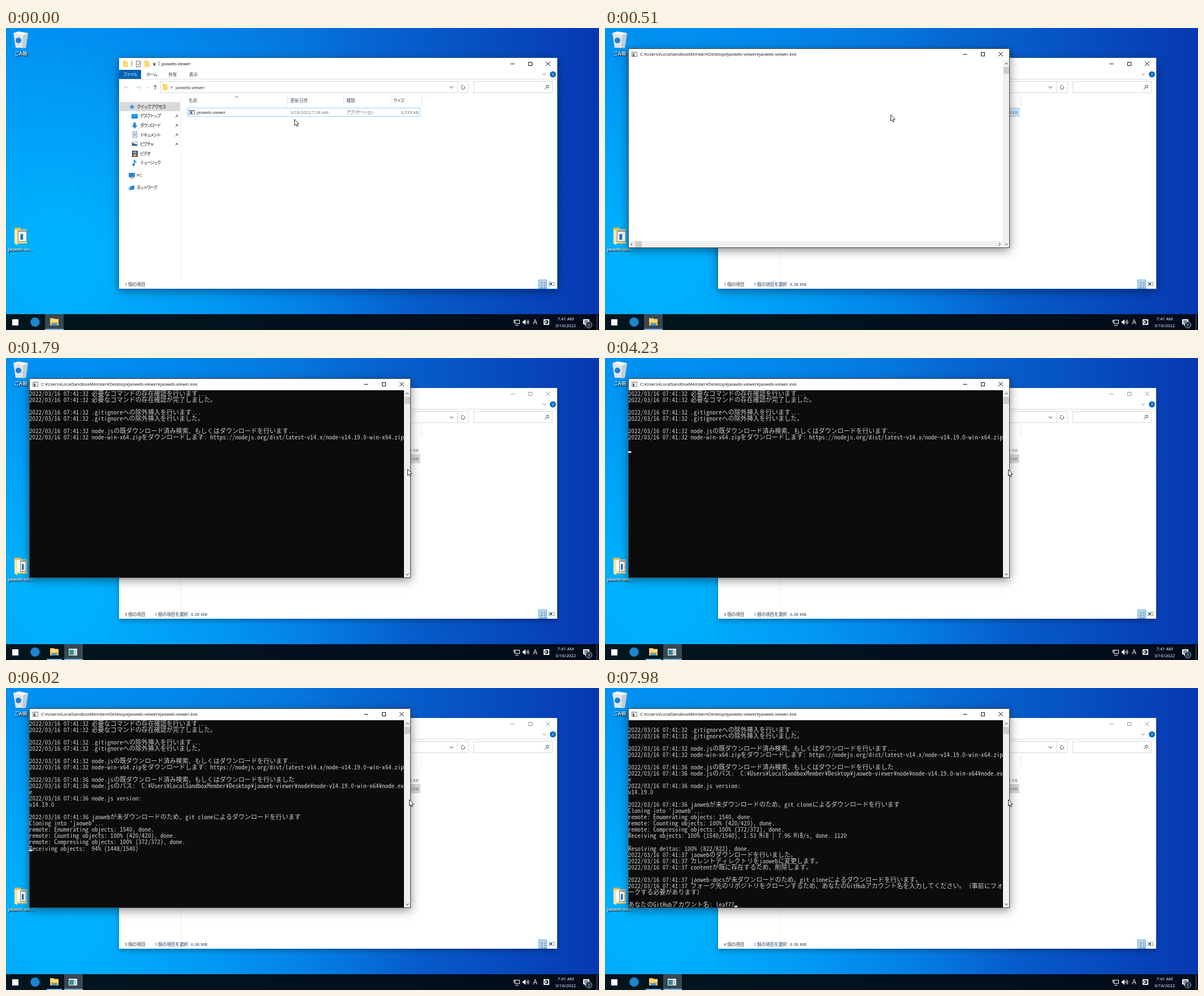
An HTML page with a canvas for the animation above (8 s loop, 1049 by 534 pixels).

```html
<!DOCTYPE html>
<html lang="ja">
<head>
<meta charset="utf-8">
<title>Console setup</title>
<style>
html, body { margin: 0; width: 100%; height: 100%; overflow: hidden; background: #0078d7; }
canvas { display: block; }
</style>
</head>
<body>
<canvas id="stage" width="1049" height="534"></canvas>
<script>
const W = 1049, H = 534, LOOP = 8000;
const g = document.getElementById('stage').getContext('2d');
const UI = '"Open Sans", "Noto Sans CJK JP", "Noto Sans CJK", sans-serif';
const MONO = '"Noto Sans Mono CJK JP", "Noto Sans CJK JP", monospace';
const KANA = -1.75;
const HOME = 'C:¥Users¥LocalSandboxMember¥Desktop¥jaoweb-viewer¥';
const PROMPT = 'あなたのGitHubアカウント名: ';
const ACCOUNT = 'leaf77';
const COLS = 120, ROWS = 30, CELL = 5.523, LINE = 11.04;
const CON = { x: 41, y: 36, w: 675, h: 353 };

// key times in ms
const SELECT = 340, OPEN = 400, WHITE = 510, BLACK = 580, BLUR = 650, FILES = 1650;
const WAIT = 2170, CLONE = 4710, TYPE = 6680;

// ---------- helpers ----------
const clamp = k => Math.max(0, Math.min(1, k));
const smooth = k => k * k * (3 - 2 * k);
const hold = (t, step) => Math.floor(t / step) * step;
const cells = ch => ch.charCodeAt(0) > 255 ? 2 : 1;

function box(x, y, w, h, c) { g.fillStyle = c; g.fillRect(x, y, w, h); }

function frame(x, y, w, h, c) {
  g.strokeStyle = c; g.lineWidth = 1;
  g.strokeRect(x + .5, y + .5, w - 1, h - 1);
}

function trace(points) {
  g.beginPath();
  for (let i = 0; i < points.length; i += 2) g.lineTo(points[i], points[i + 1]);
}

function line(c, w, ...points) {
  g.strokeStyle = c; g.lineWidth = w;
  trace(points); g.stroke();
}

function poly(c, ...points) {
  g.fillStyle = c;
  trace(points); g.fill();
}

function disc(x, y, r, c) {
  g.fillStyle = c;
  g.beginPath(); g.arc(x, y, r, 0, 7); g.fill();
}

function ring(x, y, r, c, from = 0, to = 7) {
  g.strokeStyle = c; g.lineWidth = 1;
  g.beginPath(); g.arc(x, y, r, from, to); g.stroke();
}

function text(s, x, y, c = '#222', gap = 0, align = 'left', size = 7.7) {
  g.font = size + 'px ' + UI;
  g.letterSpacing = gap + 'px';
  g.textAlign = align;
  g.fillStyle = c;
  g.fillText(s, x, y + 2.9);
}

// quarter turns: 0 right, 1 down, 2 left, 3 up
function turned(x, y, turn, paint) {
  g.save();
  g.translate(x, y); g.rotate(turn * Math.PI / 2);
  paint();
  g.restore();
}
const chevron = (x, y, r, c, turn) =>
  turned(x, y, turn, () => line(c, 1, -r * .6, -r, r * .6, 0, -r * .6, r));
const arrow = (x, y, c, turn) => turned(x, y, turn, () => {
  line(c, 1, -4, 0, 4, 0);
  line(c, 1, 1, -3, 4, 0, 1, 3);
});

function folder(x, y, w, h) {
  box(x, y, w * .5, h, '#e9b746');
  box(x, y + h * .12, w, h * .88, '#ffd875');
}

function appIcon(x, y, w, h) {
  box(x, y, w, h, '#7b8790');
  box(x + 1, y + 2, w - 2, h - 3, '#f4f8fa');
  box(x + w * .28, y + h * .32, w * .3, h * .5, '#1d6fc2');
}

function winButtons(x, y, c) {
  line(c, 1, x - 3.5, y + .5, x + 3.5, y + .5);
  frame(x + 28, y - 3, 7, 7, c);
  line(c, 1, x + 59, y - 3.5, x + 67, y + 4);
  line(c, 1, x + 67, y - 3.5, x + 59, y + 4);
}

function panel(x, y, w, h, fill, blur, shade) {
  g.save();
  g.shadowColor = 'rgba(0,0,0,' + shade + ')';
  g.shadowBlur = blur; g.shadowOffsetY = 4;
  box(x, y, w, h, fill);
  g.restore();
}

// ---------- desktop ----------
function desktop(t) {
  const base = g.createLinearGradient(0, 0, W, 0);
  base.addColorStop(0, '#0088e8');
  base.addColorStop(.5, '#0672da');
  base.addColorStop(1, '#0738b2');
  box(0, 0, W, H, base);
  const glow = g.createRadialGradient(90, 410, 60, 90, 410, 640);
  glow.addColorStop(0, 'rgba(0,180,255,.95)');
  glow.addColorStop(.4, 'rgba(0,168,255,.65)');
  glow.addColorStop(1, 'rgba(0,140,255,0)');
  box(0, 0, W, H, glow);

  poly('#dfe6ea', 13, 9, 39, 9, 35, 35, 17, 35);
  poly('#f5f7f8', 13, 9, 22, 6, 39, 9, 30, 13);
  poly('#c4ced4', 30, 13, 39, 9, 35, 35, 29, 36);
  disc(22, 22, 5, '#1f7fd6');
  label('ごみ箱', 26, 45, -.2);

  folder(15, 353, 22, 28);
  const extra = t >= FILES;
  if (extra) box(20, 357, 9, 21, '#fff');
  appIcon(extra ? 25 : 21, 358, extra ? 11 : 16, 20);
  poly('#ffe7a3', 15, 356, 20, 359, 20, 384, 15, 381);
  label('jaoweb-vie...', 26, 391, 0);
}

function label(s, x, y, gap) {
  g.save();
  g.shadowColor = '#000'; g.shadowBlur = 2;
  g.shadowOffsetX = g.shadowOffsetY = .8;
  for (let i = 0; i < 2; i++) text(s, x, y, '#fff', gap, 'center');
  g.restore();
}

// ---------- file window ----------
function explorer(t) {
  const active = t < BLUR;
  panel(200, 53, 775, 408, '#fff', active ? 16 : 8, active ? .45 : .28);
  if (active) frame(199, 52, 777, 410, '#1767b4');
  toolbar(active ? '#111' : '#999');
  navigation();
  files(t, active);
  status(t);
}

function toolbar(ink) {
  folder(207, 58, 9, 11);
  folder(245, 58, 9, 11);
  frame(230, 58, 8, 11, '#777');
  line('#c0571c', 1, 232, 63, 234, 66, 237, 61);
  box(222, 58, 1, 10, '#777');
  box(270, 59, 1, 8, '#777');
  box(260, 62, 5, 1, '#222');
  poly('#222', 260, 64, 265, 64, 262.5, 67);
  text('jaoweb-viewer', 275, 63, ink);
  winButtons(896, 63, ink);

  box(200, 74, 39, 16, '#0062b3');
  text('ファイル', 207, 82, '#fff', KANA);
  text('ホーム', 248, 82, '#333', -1.5);
  text('共有', 287, 82, '#333');
  text('表示', 324, 82, '#333');
  chevron(952, 82, 2.5, '#888', 1);
  disc(967.5, 82, 5.5, '#0f6cbd');
  text('?', 967.5, 82, '#fff', 0, 'center');
  box(200, 90, 775, 1, '#dcdcdc');

  arrow(213, 105, '#c4c4c4', 2);
  arrow(234, 105, '#c4c4c4', 0);
  chevron(250, 105, 2, '#c4c4c4', 1);
  arrow(264, 105, '#444', 3);
  frame(273, 94, 526, 21, '#d9d9d9');
  frame(798, 94, 21, 21, '#d9d9d9');
  frame(827, 94, 140, 21, '#d9d9d9');
  folder(277, 99, 9, 11);
  chevron(293, 105, 2, '#444', 0);
  text('jaoweb-viewer', 300, 105);
  chevron(788, 105, 3, '#444', 1);
  ring(808.5, 105.5, 3, '#444', -.9, 4.2);
  box(806, 101, 3, 1, '#444');
  ring(958, 103.5, 2.5, '#444');
  line('#444', 1, 956, 105.5, 953, 108.5);
}

const columns = [
  { name: '名前', x: 323, end: 497 },
  { name: '更新日時', x: 503, end: 597 },
  { name: '種類', x: 602, end: 680 },
  { name: 'サイズ', x: 685, end: 735, gap: -1.5 }
];

function files(t, active) {
  for (const c of columns) {
    text(c.name, c.x, 128, '#44546a', c.gap);
    box(c.end, 120, 1, 18, '#e3e3e3');
  }
  chevron(408, 122, 3, '#777', 3);

  const names = t < FILES ? ['jaoweb-viewer'] : ['node', '.gitignore', 'jaoweb-viewer'];
  const sizes = { '.gitignore': '1 KB', 'jaoweb-viewer': '6,535 KB' };
  const kinds = { node: 'ファイル フォルダー', '.gitignore': 'テキスト', 'jaoweb-viewer': 'アプリケーション' };
  const fill = !active ? '#d9d9d9' : t < 60 ? '#fff' : t < SELECT ? '#e5f3ff' : '#cce8ff';
  names.forEach((name, i) => {
    const y = 149 + i * 14.3;
    if (name === 'jaoweb-viewer') {
      const top = Math.round(y - 8);
      box(320, top, 413, 16, fill);
      if (active) frame(320, top, 413, 16, '#99d1ff');
    }
    appIcon(323, y - 4, 11, 8);
    text(name, columns[0].x + 14, y);
    text('3/16/2022 7:38 AM', columns[1].x, y, '#6d6d6d');
    text(kinds[name], columns[2].x, y, '#6d6d6d', KANA);
    text(sizes[name] || '', 730, y, '#6d6d6d', 0, 'right');
  });
}

function status(t) {
  const count = t >= 6490 ? 4 : t >= FILES ? 3 : 1;
  text(count + ' 個の項目', 210, 453, '#333', -.1);
  if (t >= SELECT) {
    text('1 個の項目を選択', 263, 453, '#1e395b', -.15);
    text('6.38 MB', 327, 453, '#1e395b');
  }
  box(942, 445, 15, 16, '#c5e5fb');
  frame(942, 445, 15, 16, '#4ba0dc');
  for (let y = 449; y < 459; y += 3) {
    box(945, y, 5, 1, '#667'); box(951, y, 4, 1, '#667');
  }
  frame(960, 449, 10, 7, '#8a9aa8');
  box(962, 451, 4, 3, '#24547c');
}

function star(x, y, r, c) {
  const points = [];
  for (let i = 0; i < 10; i++) {
    const a = i * Math.PI / 5, d = i % 2 ? r * .42 : r;
    points.push(x + d * Math.sin(a), y - d * Math.cos(a));
  }
  poly(c, ...points);
}

const places = [
  ['デスクトップ', y => { box(222, y - 4, 11, 8, '#0b78c9'); box(222, y - 4, 11, 6, '#1ca0ed'); }],
  ['ダウンロード', y => {
    box(225.5, y - 5, 4, 6, '#2188d8');
    poly('#2188d8', 222.5, y, 232.5, y, 227.5, y + 6);
  }],
  ['ドキュメント', y => {
    box(224, y - 6, 8, 11, '#fdfdfd');
    frame(224, y - 6, 8, 11, '#8094a4');
    for (let i = -3; i < 3; i += 2) box(226, y + i, 4, 1, '#4a8cc4');
  }],
  ['ピクチャ', y => {
    box(222, y - 4, 11, 8, '#a9b8c4');
    box(223, y - 3, 9, 6, '#e2f0fa');
    poly('#2f6b96', 223, y - 2, 232, y + 1, 232, y + 3, 223, y + 3);
  }],
  ['ビデオ', y => {
    box(223, y - 5, 10, 11, '#39424d');
    box(225, y - 4, 6, 4, '#6ba4d8');
    box(225, y + 1, 6, 4, '#d09a6c');
  }],
  ['ミュージック', y => {
    line('#1878cf', 1.6, 227, y + 3, 227, y - 5, 230.5, y - 1);
    disc(225.5, y + 3, 2, '#1878cf');
  }]
];

function navigation() {
  box(309, 117, 1, 328, '#f0f0f0');
  box(201, 131, 107, 16, '#d9d9d9');
  star(223, 139.5, 5, '#2a8dd4');
  text('クイック アクセス', 231, 139, '#222', -1.35);
  places.forEach(([name, icon], i) => {
    const y = 155.5 + i * 16.6;
    icon(Math.round(y));
    text(name, 237, y, '#222', KANA);
    if (i < 4) {
      line('#777', 1, 299, y + 3, 304, y - 2);
      line('#777', 2, 301, y - 1.5, 304, y + 1);
    }
  });

  box(217, 256, 11, 8, '#6c8ba3');
  box(218, 257, 9, 6, '#1f87d6');
  box(219, 265, 7, 1, '#6c8ba3');
  text('PC', 231, 260.5);
  poly('#75b7e6', 217, 282, 223, 280, 223, 286, 217, 287);
  poly('#2c83c8', 220, 280, 227, 278, 227, 285, 220, 287);
  text('ネットワーク', 231, 282.5, '#222', KANA);
}

// ---------- console window ----------
function consoleWindow(t) {
  if (t < OPEN) return;
  const k = clamp((hold(t - OPEN, 55) + 55) / (WHITE - OPEN + 55));
  const cx = CON.x + CON.w / 2, cy = CON.y + CON.h / 2, scale = .9 + .1 * k;
  g.save();
  g.globalAlpha = k;
  g.translate(cx, cy); g.scale(scale, scale); g.translate(-cx, -cy);
  panel(CON.x, CON.y, CON.w, CON.h, '#444', 16, .45);
  box(42, 37, 673, 351, '#fff');
  frame(47, 42, 10, 9, '#8a8a8a');
  box(48, 43, 8, 1, '#c8c8c8');
  box(49, 45, 3, 5, '#5b6570');
  text(HOME + 'jaoweb-viewer.exe', 62, 46.5, '#111');
  winButtons(637, 46, '#111');
  box(704, 57, 11, 331, '#f0f0f0');
  box(705, 69, 10, 12, '#cdcdcd');
  chevron(710, 63, 2.5, '#444', 3);
  if (t < BLACK) {
    box(42, 377, 673, 11, '#f0f0f0');
    box(53, 377, 12, 11, '#cdcdcd');
    chevron(47, 382.5, 2.5, '#444', 2);
    chevron(698, 382.5, 2.5, '#444', 0);
  } else {
    box(42, 57, 662, 331, '#0c0c0c');
    terminal(t);
  }
  chevron(710, 382.5, 2.5, '#444', 1);
  g.restore();
}

// a line that counts up from `start` and then shows its ending
const counter = (name, total, start, length, ending) => t => {
  const k = clamp(hold(t - start, 63) / length), n = Math.floor(total * k);
  return name + ' objects: ' + String(Math.floor(100 * n / total)).padStart(3) +
    '% (' + n + '/' + total + ')' + (k < 1 ? '' : ending);
};
const stamped = (sec, ...lines) => lines.map(s => s && '2022/03/16 07:41:' + sec + ' ' + s);
const typed = t => {
  const when = i => i < 4 ? TYPE + i * 170 : 7720 + (i - 4) * 260;
  return PROMPT + [...ACCOUNT].filter((ch, i) => t >= when(i)).join('');
};

// each step prints its lines below the ones before
const steps = [
  [BLUR, ...stamped(32, '必要なコマンドの存在確認を行います...', '必要なコマンドの存在確認が完了しました。', '')],
  [710, ...stamped(32, '.gitignoreへの除外挿入を行います...', '.gitignoreへの除外挿入を行いました。', '')],
  [770, ...stamped(32, 'node.jsの既ダウンロード済み検索、もしくはダウンロードを行います...',
    'node-win-x64.zipをダウンロードします: https://nodejs.org/dist/latest-v14.x/node-v14.19.0-win-x64.zip', '')],
  [CLONE, ...stamped(36, 'node.jsの既ダウンロード済み検索、もしくはダウンロードを行いました',
    'node.jsのパス:  ' + HOME + 'node¥node-v14.19.0-win-x64¥node.exe')],
  [4780, ...stamped(36, 'node.js version:'), 'v14.19.0', ''],
  [4850, ...stamped(36, 'jaowebが未ダウンロードのため、git cloneによるダウンロードを行います'),
    "Cloning into 'jaoweb'..."],
  [5490, 'remote: Enumerating objects: 1540, done.'],
  [5560, counter('remote: Counting', 420, 5560, 60, ', done.')],
  [5690, counter('remote: Compressing', 372, 5690, 120, ', done.')],
  [5830, counter('Receiving', 1540, 5830, 201, ', 1.53 MiB | 7.96 MiB/s, done. 1120')],
  [6080, '', 'Resolving deltas: 100% (822/822), done.'],
  [6200, ...stamped(37, 'jaowebのダウンロードを行いました。', 'カレントディレクトリをjaowebに変更します。',
    'contentが既に存在するため、削除します。', '')],
  [6270, ...stamped(37, 'jaoweb-docsが未ダウンロードのため、git cloneによるダウンロードを行います。',
    'フォーク先のリポジトリをクローンするため、あなたのGitHubアカウント名を入力してください。' +
    '（事前にフォークする必要があります）', ''), typed]
];

function wrap(s) {
  const rows = [''];
  let used = 0;
  for (const ch of s) {
    if (used + cells(ch) > COLS) { rows.push(''); used = 0; }
    rows[rows.length - 1] += ch;
    used += cells(ch);
  }
  return rows;
}

function caretLit(t) {
  const blink = d => d % 1030 < 515;
  if (t < WAIT) return t < BLUR;
  if (t < CLONE) return blink(t - WAIT);
  return t < TYPE || blink(t - TYPE);
}

function terminal(t) {
  const rows = steps.filter(s => s[0] <= t)
    .flatMap(([, ...lines]) => lines.flatMap(s => wrap(s.call ? s(t) : s)));
  const last = rows[rows.length - 1] || '';
  const asking = last.startsWith(PROMPT), counting = last.endsWith(')');
  const row = rows.length - (asking || counting ? 1 : 0);
  const col = asking ? [...last].reduce((n, ch) => n + cells(ch), 0) : 0;
  const top = Math.max(0, row + 1 - ROWS);

  g.save();
  g.beginPath(); g.rect(41, 57, 663, 331); g.clip();
  g.font = '11px ' + MONO;
  g.letterSpacing = '0px';
  g.textAlign = 'center';
  g.fillStyle = '#ccc';
  rows.slice(top).forEach((s, r) => {
    let x = 41;
    for (const ch of s) {
      const w = cells(ch) * CELL;
      g.fillText(ch, x + w / 2, 57 + r * LINE + 9.7);
      x += w;
    }
  });
  if (caretLit(t)) {
    const y = 57 + (row - top + 1) * LINE;
    box(41 + col * CELL, Math.round(y - 2.8), CELL, 2.6, '#fff');
  }
  g.restore();
}

// ---------- taskbar ----------
function taskbar(t) {
  const open = t >= BLACK;
  const shade = g.createLinearGradient(0, 0, W, 0);
  shade.addColorStop(0, '#02161f');
  shade.addColorStop(1, '#030c1c');
  box(0, 506, W, 28, shade);
  box(11, 515, 11, 11, '#fff');
  disc(51.5, 520, 8.2, '#1b86cf');

  box(open ? 103 : 69, 506, 33, 28, '#384852');
  box(open ? 72 : 69, 532, open ? 27 : 33, 2, '#76b9ed');
  folder(78, 513, 15, 13);
  box(78, 520, 15, 6, '#f5b93e');
  box(81, 522, 9, 4, '#3a96dd');
  if (open) {
    box(103, 532, 33, 2, '#76b9ed');
    box(111, 514, 15, 12, '#e8ecee');
    box(112, 516, 8, 9, '#3b8f98');
    box(121, 516, 4, 9, '#c2cbd0');
  }

  frame(900, 516, 9, 7, '#fff');
  frame(898, 516, 3, 5, '#fff');
  box(901, 525, 6, 1, '#fff');
  poly('#fff', 914, 518, 916, 518, 919, 515, 919, 525, 916, 522, 914, 522);
  for (let r = 2; r < 7; r += 2) ring(919, 520, r, '#fff', -.8, .8);
  text('A', 936, 520.8, '#fff', 0, 'center', 12);
  box(951, 515, 10, 10, '#fff');
  disc(956, 520, 3.4, '#0a1420');
  box(954, 518, 2, 4, '#fff');
  text('7:41 AM', 990, 514, '#fff', 0, 'center');
  text('3/16/2022', 990, 526, '#fff', 0, 'center');
  box(1021, 515, 11, 9, '#fff');
  poly('#fff', 1023, 523, 1028, 523, 1025, 527);
  for (let y = 517; y < 522; y += 2) box(1023, y, 7, 1, '#14202c');
  disc(1031, 525, 5.5, '#24343f');
  ring(1031, 525, 5.5, '#9aa6ae');
  text('1', 1031, 525, '#fff', 0, 'center', 7);
  box(1045, 507, 1, 27, '#5a6670');
}

// ---------- pointer ----------
const moves = [
  { from: 0, to: 180, x: 505, y: 153 },
  { from: 710, to: 770, x: 505, y: 159 },
  { from: 990, to: 1170, x: 512, y: 161 },
  { from: 1430, to: 1790, x: 710, y: 196 },
  { from: 2050, to: 2110, x: 713, y: 197 }
];

function pointer(t) {
  let x = 510, y = 161;
  for (const m of moves) {
    const k = smooth(clamp(hold(t - m.from, 60) / (m.to - m.from)));
    x += (m.x - x) * k;
    y += (m.y - y) * k;
  }
  const shape = [0, 0, 0, 11, 2.5, 8.8, 4.2, 12.6, 6, 11.8, 4.4, 8, 7.6, 8, 0, 0];
  g.save();
  g.translate(Math.round(x) + .5, Math.round(y) + .5);
  poly('#fff', ...shape);
  line('#1a1a1a', .9, ...shape);
  g.restore();
}

function draw(t) {
  desktop(t);
  explorer(t);
  consoleWindow(t);
  taskbar(t);
  pointer(t);
}

const start = performance.now();
function tick() {
  draw((performance.now() - start) % LOOP);
  requestAnimationFrame(tick);
}
tick();
</script>
</body>
</html>
```
